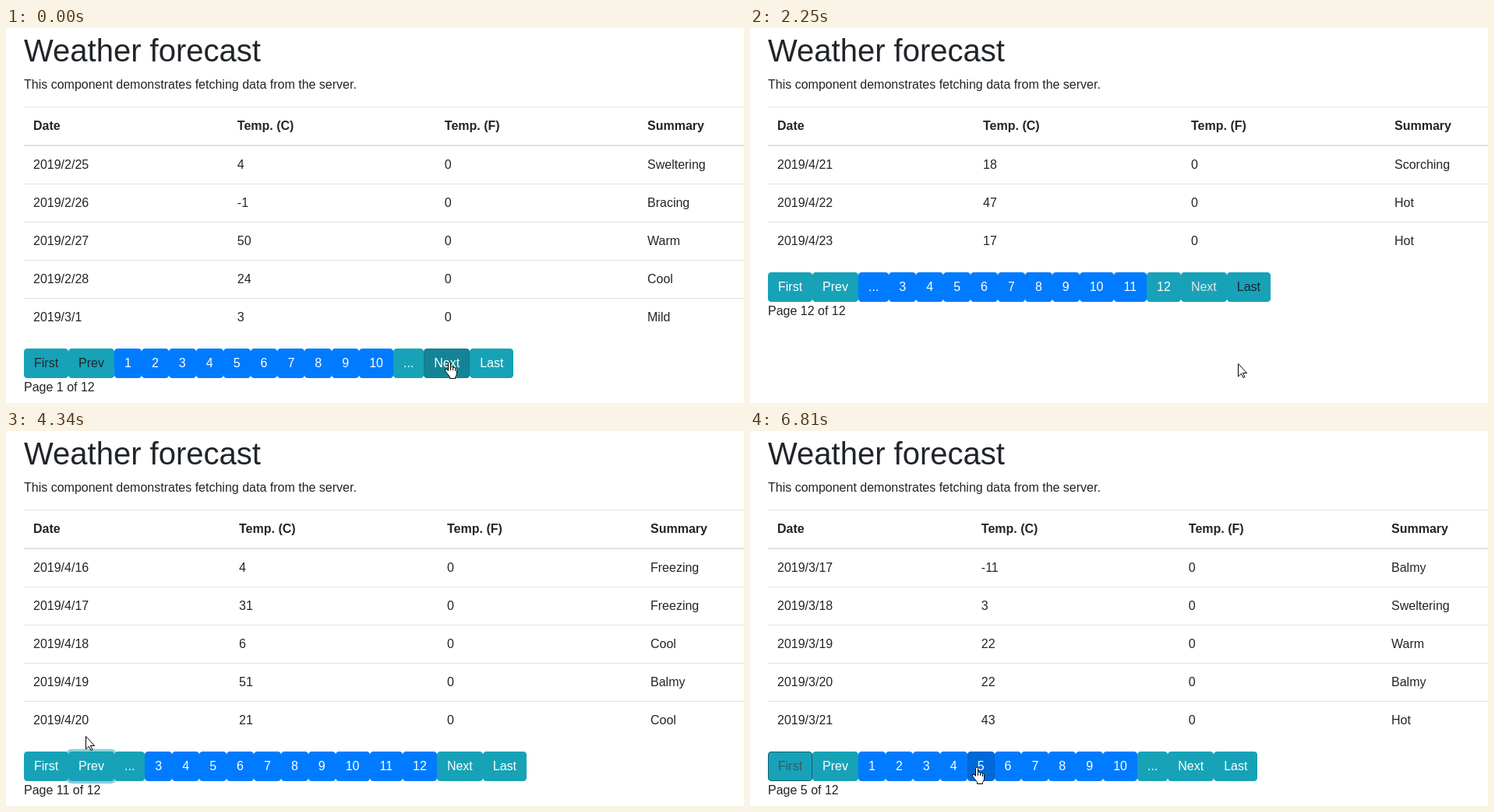
Write an HTML page that moves like this. It is 947x482 px and loops after 7.06 s.

```html
<!DOCTYPE html>
<html lang="en">
<head>
<meta charset="utf-8">
<title>Weather forecast</title>
<style>
  html, body { margin: 0; width: 100%; height: 100%; overflow: hidden; background: #fff; }
  body { position: relative; font: 16px/24px "Liberation Sans", Arial, sans-serif; color: #212529; }
  h1 { position: absolute; left: 23px; top: 5px; margin: 0; font: 40px/48px "Liberation Sans", Arial, sans-serif; }
  p { position: absolute; left: 23px; top: 61px; margin: 0; }
  .row { position: absolute; left: 23px; right: 0; height: 49px; box-sizing: border-box; border-top: 1px solid #dee2e6; }
  .row span { position: absolute; top: 12px; white-space: nowrap; }
  .head { height: 51px; border-bottom: 2px solid #dee2e6; font-weight: bold; }
  #pager { position: absolute; left: 23px; white-space: nowrap; }
  #buttons { display: flex; }
  button {
    font: inherit; color: #fff; background: #007bff; border: 1px solid #007bff;
    border-radius: 4px; padding: 6px 12px; margin: 0; flex: none;
  }
  .info { background: #17a2b8; border-color: #17a2b8; }
  .off { color: #212529; }
  .hover { background: #0069d9; border-color: #0062cc; }
  .active { background: #0062cc; border-color: #005cbf; }
  .info.hover { background: #138496; border-color: #117a8b; }
  .info.active { background: #117a8b; border-color: #10707f; }
  .ring { box-shadow: 0 0 0 3.2px rgba(0, 123, 255, .5); }
  .info.ring { box-shadow: 0 0 0 3.2px rgba(23, 162, 184, .5); }
  .primary { background: #007bff; border-color: #007bff; }
  .fading { background: #0071ec; border-color: #006fe6; }
  .info.fading { background: #169db2; border-color: #169ab0; }
  .dimming { color: #e4e6e7; }
  .waking { color: #46545b; border-color: #10606d; }
  #cursor { position: absolute; left: 0; top: 0; overflow: visible; }
</style>
</head>
<body>
<h1>Weather forecast</h1>
<p>This component demonstrates fetching data from the server.</p>
<div id="table"></div>
<div id="pager"><div id="buttons"></div><div id="label"></div></div>
<svg id="cursor" width="20" height="24" fill="#fff" stroke="#000"><path/></svg>
<script>
const LOOP = 7060, PAGES = 12, PAGE_SIZE = 5;
const $ = selector => document.querySelector(selector);

const CURSORS = {
  hand: 'M5.5.5h1l1 1v5h2l1 1h2l1 1h1l1 1v6l-1 3-1 1v2h-7v-2l-3-4-3-4v-2h2l2 2v-10z' +
        'M7.5 7v4M10.5 8v3M13.5 9v3',
  arrow: 'M.5.5v16.5l3.8-3.7 2.7 5.2 2-1-2.6-5h5.2z',
  beam: 'M.5.5h2l1 1 1-1h2M3.5 1v14M.5 15.5h2l1-1 1 1h2'
};

// Each view is one fetched page: Celsius and summary for every row.
const view = (page, rows) => ({ page, rows: rows.split(',').map(row => row.split(' ')) });
const start = view(1, '4 Sweltering,-1 Bracing,50 Warm,24 Cool,3 Mild');
const second = view(2, '12 Chilly,35 Hot,-7 Freezing,28 Balmy,19 Mild');
const third = view(3, '6 Freezing,7 Mild,41 Warm,-12 Cool,37 Cool');
const last = view(12, '18 Scorching,47 Hot,17 Hot');
const eleventh = view(11, '4 Freezing,31 Freezing,6 Cool,51 Balmy,21 Cool');
const tenth = view(10, '-10 Freezing,2 Chilly,17 Chilly,40 Sweltering,40 Balmy');
const first = view(1, '24 Scorching,12 Balmy,38 Freezing,42 Chilly,30 Mild');
const fifth = view(5, '-11 Balmy,3 Sweltering,22 Warm,22 Balmy,43 Hot');

// time, view, cursor, x, y, extra button classes
const STEPS = [
  [0, start, 'hand', 563, 429, { Next: 'hover' }],
  [260, start, 'hand', 563, 429, { Next: 'active ring' }],
  [510, second, 'hand', 563, 429, { Next: 'hover ring' }],
  [760, second, 'hand', 570, 429, { Next: 'hover ring' }],
  [1000, second, 'hand', 576, 428, { Next: 'active ring' }],
  [1250, third, 'hand', 576, 428, { Next: 'hover ring' }],
  [1500, third, 'hand', 598, 430, { Next: 'fading ring', Last: 'hover' }],
  [1750, third, 'hand', 620, 431, { Next: 'ring', Last: 'hover' }],
  [2000, third, 'hand', 620, 431, { Last: 'active ring' }],
  [2250, last, 'arrow', 626, 431, { '...': 'primary', 12: 'info', Next: 'dimming' }],
  [2500, last, 'arrow', 626, 431, {}],
  [3000, last, 'arrow', 378, 395, {}],
  [3290, last, 'arrow', 160, 358, {}],
  [3540, last, 'hand', 94, 330, { Prev: 'hover' }],
  [3790, eleventh, 'beam', 97, 322, { Prev: 'fading ring' }],
  [4110, eleventh, 'arrow', 102, 392, { Prev: 'ring' }],
  [4350, eleventh, 'hand', 98, 429, { Prev: 'hover ring' }],
  [4600, tenth, 'hand', 98, 429, { Prev: 'hover ring' }],
  [4850, tenth, 'hand', 52, 424, { First: 'hover', Prev: 'ring' }],
  [5080, tenth, 'hand', 48, 423, { First: 'active ring' }],
  [5310, first, 'arrow', 54, 423, {}],
  [5560, first, 'hand', 160, 434, { 1: 'fading', 2: 'hover' }],
  [5810, first, 'hand', 245, 436, { 3: 'fading' }],
  [6070, first, 'hand', 276, 434, { 4: 'fading', 5: 'hover' }],
  [6340, first, 'hand', 285, 432, { 5: 'hover' }],
  [6590, first, 'hand', 285, 432, { 5: 'active ring' }],
  [6810, fifth, 'hand', 285, 432, { First: 'waking', 5: 'hover' }]
];

const range = (from, to) => Array.from({ length: to - from + 1 }, (_, i) => from + i);

function dateText(index) {
  const date = new Date(2019, 1, 25 + index);
  return [date.getFullYear(), date.getMonth() + 1, date.getDate()].join('/');
}

function drawTable({ page, rows }) {
  // The longest summary widens the last column and narrows the others.
  const wide = rows.some(row => row[1] === 'Sweltering');
  const columns = wide ? [12, 273.8, 539.8, 800] : [12, 276, 543, 804];
  const line = (cells, top, name = '') => `<div class="row ${name}" style="top:${top}px">` +
    cells.map((cell, i) => `<span style="left:${columns[i]}px">${cell}</span>`).join('') + '</div>';
  $('#table').innerHTML =
    rows.map(([celsius, summary], i) =>
      line([dateText((page - 1) * PAGE_SIZE + i), celsius, 0, summary], 151 + 49 * i)).join('') +
    line(['Date', 'Temp. (C)', 'Temp. (F)', 'Summary'], 101, 'head');
}

function drawPager({ page, rows }, extra) {
  const numbers = page < 10 ? [...range(1, 10), '...'] : ['...', ...range(3, PAGES)];
  const disabled = { 1: ['First', 'Prev'], [PAGES]: ['Next', 'Last'] }[page] || [];
  $('#buttons').innerHTML = ['First', 'Prev', ...numbers, 'Next', 'Last'].map(name => {
    const classes = [
      typeof name === 'string' ? 'info' : '',
      disabled.includes(name) ? 'off' : '',
      extra[name] || ''
    ];
    return `<button class="${classes.join(' ')}">${name}</button>`;
  }).join('');
  $('#label').textContent = `Page ${page} of ${PAGES}`;
  $('#pager').style.top = 167 + 49 * rows.length + 'px';
}

let shown;
function frame(now) {
  const time = now % LOOP;
  const step = STEPS.findLast(([begin]) => begin <= time);
  if (step !== shown) {
    const [, data, cursor, x, y, extra] = shown = step;
    drawTable(data);
    drawPager(data, extra);
    $('#cursor').style.transform = `translate(${x}px, ${y}px)`;
    $('#cursor path').setAttribute('d', CURSORS[cursor]);
    $('#cursor path').setAttribute('fill', cursor === 'beam' ? 'none' : '#fff');
  }
  requestAnimationFrame(frame);
}
frame(0);
</script>
</body>
</html>
```
